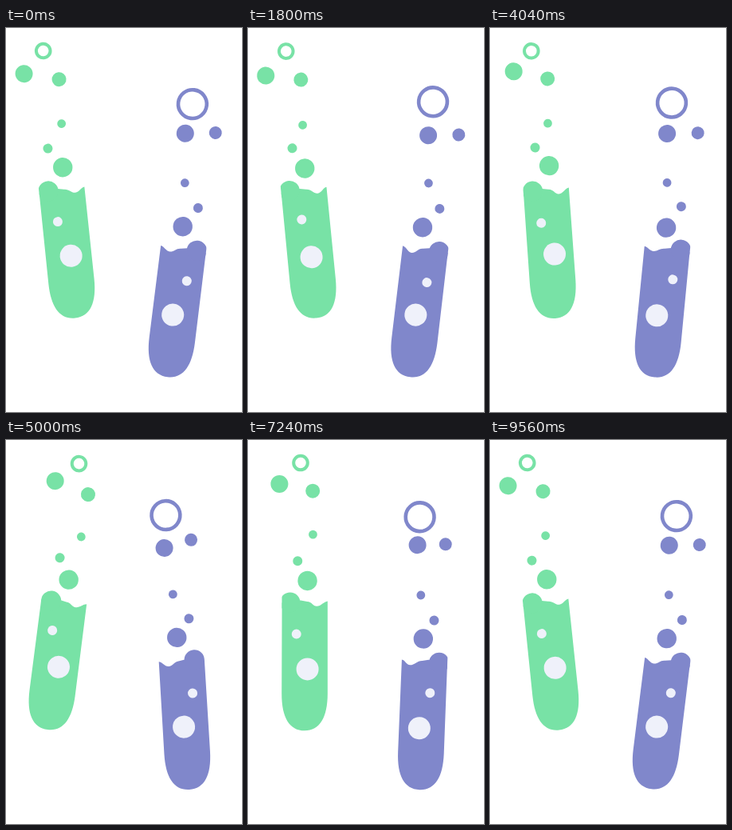
Recreate the animation shown at these times as an HTML page. Size 296 by 480 pixels, loop 9.6 s.

```html
<!DOCTYPE html>
<html>
<head>
<meta charset="utf-8">
<title>Bubbling test tubes</title>
<style>
  html, body { margin: 0; height: 100%; overflow: hidden; background: #fff; }
  svg { display: block; width: 100%; height: 100%; }
</style>
</head>
<body>
<svg id="stage" viewBox="0 0 296 480">
  <clipPath id="neck"><rect x="-28.7" y="-60" width="57.4" height="150"/></clipPath>
</svg>
<script>
const LOOP = 9600, SWING = 1920, STEPS = 16;
const GLASS = '#eff1fa';
const stage = document.getElementById('stage');

// Both tubes share one design; side -1 mirrors it. The origin is the pivot.
const tubes = [
  {
    color: '#78e2a6', x: 71.2, y: 214, side: 1, lean: 1.6, sway: -7.6,
    ring: { r: 8.8, w: 4, x: -5, y: -187 },
    top: [{ r: 11, x: -32, y: -161 }, { r: 9, x: 11, y: -149.5 }]
  },
  {
    color: '#8087cb', x: 221, y: 288, side: -1, lean: 1.07, sway: 6.03,
    ring: { r: 17.9, w: 4.6, x: 11, y: -193 },
    top: [{ r: 11, x: 15.5, y: -155.5 }, { r: 8, x: -22, y: -161 }]
  }
];
const rising = [
  { r: 5.4, x: 8.3, y: -94 },
  { r: 6, x: -12, y: -65 },
  { r: 12.2, x: 4.2, y: -39.6 }
];
const holes = [
  { r: 6, x: -9.2, y: 27.3 },
  { r: 14, x: 3, y: 71.5 }
];
const bump = { r: 12.7, x: -17, y: -11.8 };
const dip = { x: 16.5, y: -6.5 };

function add(parent, tag, attrs) {
  const el = document.createElementNS('http://www.w3.org/2000/svg', tag);
  for (const k in attrs) el.setAttribute(k, attrs[k]);
  return parent.appendChild(el);
}

function seeded(n) {
  const v = Math.sin(n * 12.9898) * 43758.5453;
  return (v - Math.floor(v)) * 2 - 1;
}

let seeds = 0;
// Eases from one random offset to the next; every loop begins and ends at home.
function wander(reach) {
  const id = ++seeds * 100;
  const offset = k => k % STEPS ? reach * seeded(id + k) : 0;
  return t => {
    const s = t / LOOP * STEPS, k = Math.floor(s), u = s - k;
    return offset(k) + (offset(k + 1) - offset(k)) * u * u * (3 - 2 * u);
  };
}

function drifter(home, side, reach) {
  const dx = wander(reach), dy = wander(reach);
  return t => [side * home.x + dx(t), home.y + dy(t)];
}

function build(tube) {
  const { color, side, ring } = tube;
  const g = add(stage, 'g', { fill: color });
  const body = add(g, 'path', {});
  const neck = add(g, 'g', { 'clip-path': 'url(#neck)' });
  const moving = [];
  const circle = (parent, home, reach, attrs) =>
    moving.push([add(parent, 'circle', { r: home.r, ...attrs }), drifter(home, side, reach)]);

  circle(neck, bump, 1.5);
  circle(g, ring, 3, { fill: 'none', stroke: color, 'stroke-width': ring.w });
  [...tube.top, ...rising].forEach(dot => circle(g, dot, 3));
  holes.forEach(hole => circle(g, hole, 3, { fill: GLASS }));
  const dipAt = drifter(dip, side, 1.5);
  const pt = (x, y) => `${x * side} ${y} `;

  return t => {
    const angle = tube.lean + tube.sway * Math.cos(2 * Math.PI * (t + 20) / SWING);
    g.setAttribute('transform', `translate(${tube.x} ${tube.y}) rotate(${angle})`);
    for (const [el, at] of moving) {
      const [x, y] = at(t);
      el.setAttribute('cx', x);
      el.setAttribute('cy', y);
    }
    const [px, y] = dipAt(t), x = px * side;
    body.setAttribute('d',
      'M' + pt(28.6, -12.5) +
      'C' + pt(24, -12) + pt(x + 5, y) + pt(x, y) +
      'C' + pt(x - 5, y) + pt(9, -12) + pt(3, -12) +
      'L' + pt(-5, -13.5) + pt(-28.6, -10.5) + pt(-28.8, 103) +
      'C' + pt(-28.8, 133) + pt(-19, 149.3) + pt(0, 149.3) +
      'C' + pt(19, 149.3) + pt(28.8, 133) + pt(28.8, 103) + 'Z');
  };
}

const updates = tubes.map(build);
const start = performance.now();

function frame(now) {
  const t = Math.max(0, now - start) % LOOP;
  updates.forEach(update => update(t));
  requestAnimationFrame(frame);
}
frame(start);
</script>
</body>
</html>
```
